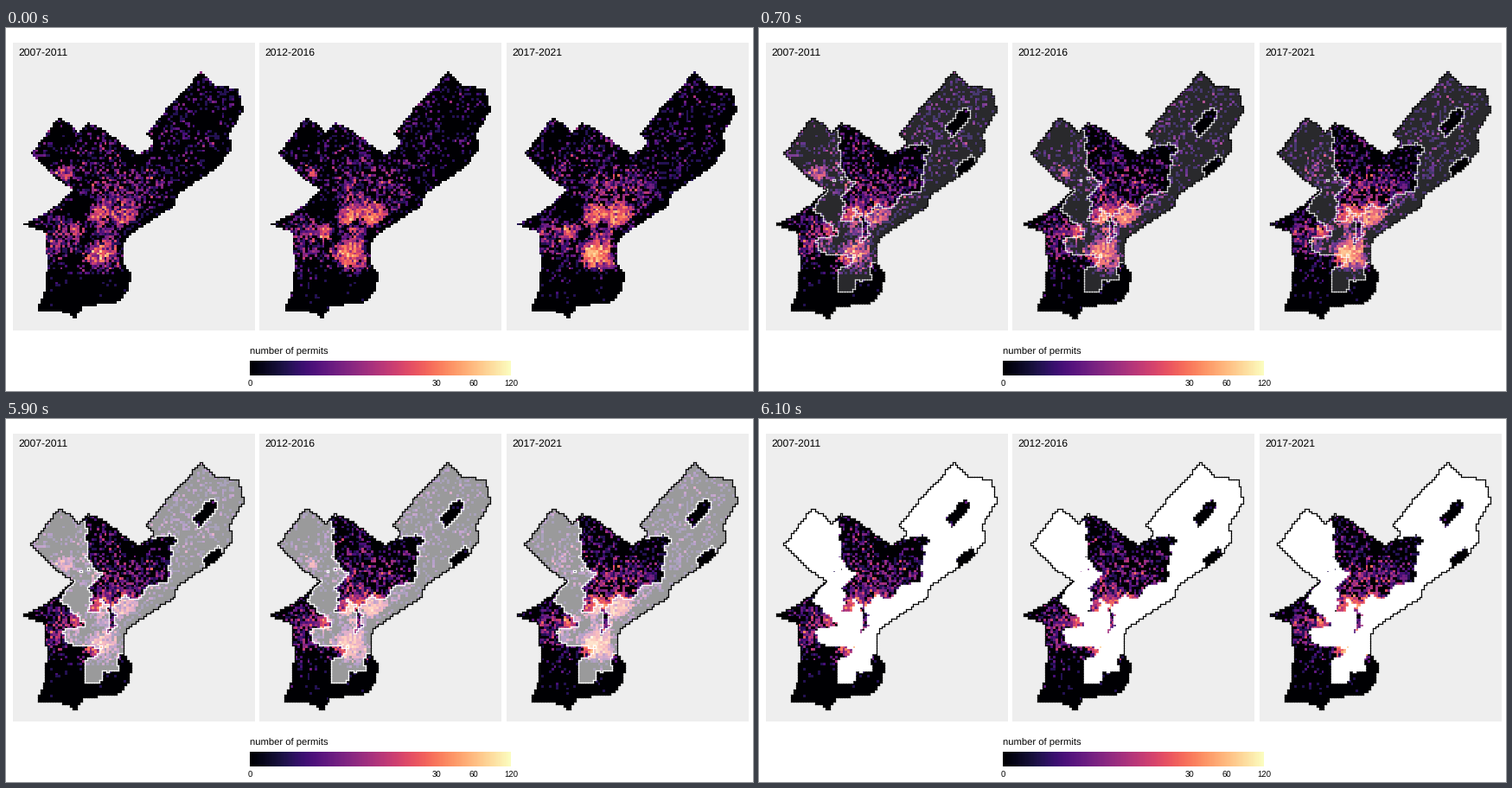
A matplotlib script for the animation above (8 s loop, 864 px wide and 420 px high).

```python
import numpy as np
import matplotlib.pyplot as plt
from matplotlib.animation import FuncAnimation
from matplotlib.collections import LineCollection
from matplotlib.path import Path
from matplotlib.patches import Rectangle

W, H, DPI = 864, 420, 100
FRAME_MS, FRAMES = 100, 80
PITCH = 285.5
CELL, X0, Y0, NX, NY = 2.83, 20, 50, 91, 102
PERIODS = ["2007-2011", "2012-2016", "2017-2021"]

# key points of the city limit, clockwise, and of the areas that stay dark
CITY = [(162, 123), (190, 88), (226, 50), (240, 66), (268, 70), (275, 95),
        (257, 123), (262, 139), (243, 163), (215, 181), (200, 191), (193, 207),
        (157, 230), (138, 243), (135, 269), (144, 285), (142, 302), (132, 317),
        (90, 322), (80, 337), (70, 329), (36, 327), (45, 301), (48, 272),
        (44, 236), (19, 228), (50, 212), (77, 187), (55, 172), (29, 145),
        (62, 102), (84, 120), (96, 110), (113, 118), (153, 147), (172, 132)]
NORTH = [(84, 112), (113, 110), (153, 140), (163, 135), (201, 135), (190, 150),
         (189, 184), (158, 197), (156, 208), (138, 205), (125, 216), (125, 247),
         (117, 247), (119, 212), (109, 212), (109, 223), (96, 223), (97, 191),
         (107, 180), (92, 157), (93, 125)]
SOUTHWEST = [(80, 185), (62, 210), (82, 228), (92, 236), (66, 246), (66, 255),
             (82, 262), (108, 263), (108, 270), (92, 279), (90, 304), (109, 305),
             (110, 291), (128, 291), (130, 271), (150, 270), (150, 345), (10, 345),
             (10, 185)]
AIRFIELD = [(215, 119), (220, 109), (238, 90), (246, 101), (222, 125)]
RIVERSIDE = [(226, 161), (245, 146), (253, 157), (232, 176)]
SPOTS = [(87, 177), (96, 173)]

# x, y, radius, first strength, growth from period to period
HOTSPOTS = [(111, 217, 12, 20, 1.25), (137, 217, 13, 15, 1.6), (105, 262, 11, 20, 1.4),
            (118, 264, 15, 10, 1.6), (82, 236, 8, 14, 1.1), (62, 241, 20, 4, 1.1),
            (120, 245, 14, 6, 1.2), (118, 190, 17, 3.5, 1.15), (66, 167, 8, 10, .7),
            (158, 193, 22, 2, 1.1), (125, 162, 38, .9, 1.15)]
# x, y, radius of areas with hardly any permits
VOIDS = [(82, 208, 16), (231, 107, 14), (94, 241, 6), (120, 227, 6),
         (240, 160, 10), (147, 146, 14), (66, 126, 14), (130, 290, 12), (98, 295, 12)]

gx, gy = np.meshgrid(X0 + (np.arange(NX) + .5) * CELL, Y0 + (np.arange(NY) + .5) * CELL)


def inside(points, ragged=0):
    """Cells within a polygon; ragged moves its edge to and fro by that many pixels."""
    x = gx + ragged * (np.sin(gy * .52) + np.sin(gy * .21 + gx * .05))
    y = gy + ragged * (np.sin(gx * .47) + np.sin(gx * .23 + gy * .07))
    return Path(points).contains_points(np.c_[x.ravel(), y.ravel()]).reshape(gx.shape)


city = inside(CITY)
dark = inside(NORTH, 1.3) | inside(SOUTHWEST, .8) | inside(AIRFIELD, .8) | inside(RIVERSIDE)
for sx, sy in SPOTS:
    dark[int((sy - Y0) / CELL), int((sx - X0) / CELL)] = True
dark &= city
zone = city & ~dark


def borders(a, b):
    """Cell edges that have a on one side and b on the other."""
    a, b = np.pad(a, 1), np.pad(b, 1, constant_values=b[0, 0])
    side = (a[:, :-1] & b[:, 1:]) | (b[:, :-1] & a[:, 1:])
    level = (a[:-1] & b[1:]) | (b[:-1] & a[1:])
    edges = [((c, r - 1), (c, r)) for r, c in np.argwhere(side)]
    edges += [((c - 1, r), (c, r)) for r, c in np.argwhere(level)]
    return np.array(edges, float) * CELL + (X0, Y0)


def bump(x, y, radius, power):
    reach = ((gx - x) ** 2 + (gy - y) ** 2) / radius ** 2
    return np.exp(-reach ** power)


def permits(period, rng):
    rate = np.full(gx.shape, .5)
    for x, y, radius, strength, growth in HOTSPOTS:
        rate += strength * growth ** period * bump(x, y, radius, 1.4)
    for x, y, radius in VOIDS:
        rate *= 1 - .95 * bump(x, y, radius, 3)
    rate *= .12 + .88 / (1 + np.exp((gy - 288) / 5))
    shore = ~np.roll(city, (-3, -3), axis=(0, 1))
    rate[shore] *= .15
    shape = .22 + rate / 11
    return rng.poisson(rng.gamma(shape) / shape * rate)


plt.rcParams["text.hinting"] = "none"
fig = plt.figure(figsize=(W / DPI, H / DPI), dpi=DPI, facecolor="white")
ax = fig.add_axes([0, 0, 1, 1])
ax.axis("off")


def label(x, y, text, px, **kw):
    ax.text(x, y, text, family="Liberation Sans", fontsize=px * 72 / DPI,
            color="black", va="baseline", **kw)


def image(data, left, **kw):
    extent = (X0 + left, X0 + left + NX * CELL, Y0 + NY * CELL, Y0)
    return ax.imshow(data, extent=extent, aspect="auto", interpolation="nearest", **kw)


def outline(edges, left, color, width, z):
    lines = LineCollection(edges + (left, 0), colors=color, linewidths=width * 72 / DPI,
                           capstyle="projecting", zorder=z)
    return ax.add_collection(lines)


rng = np.random.default_rng(7)
veil = np.ones((NY, NX, 4))
veil[..., 3] = zone
inner, outer = borders(zone, dark), borders(city, ~city)
veils, strokes = [], []
for i, name in enumerate(PERIODS):
    left = i * PITCH
    ax.add_patch(Rectangle((8 + int(left), 17), 280, 333, fc="#eeeeee", lw=0, zorder=0))
    label(14 + left, 32, name, 12.1)
    shade = np.log1p(permits(i, rng)) / np.log(121)
    image(np.ma.masked_where(~city, shade), left, cmap="magma", vmin=0, vmax=1, zorder=1)
    veils.append(image(veil, left, zorder=2))
    strokes.append(outline(inner, left, "white", 1.3, 3))
    strokes.append(outline(outer, left, "black", 1.2, 4))

label(282, 378, "number of permits", 11.2)
ax.imshow(np.linspace(0, 1, 302)[None], cmap="magma", extent=(282, 584, 402, 385),
          aspect="auto", interpolation="nearest")
for n in (0, 30, 60, 120):
    label(282 + 302 * np.log1p(n) / np.log(121), 415, str(n), 9.6, ha="center")
ax.set_xlim(0, W)
ax.set_ylim(H, 0)


def ramp(frame, start):
    return min(max(frame - start + 1, 0), 4) / 4


def update(frame):
    shown, cleared = ramp(frame, 5), ramp(frame, 58)
    for v in veils:
        v.set_alpha(.22 * shown + .78 * cleared)
    for s in strokes:
        s.set_alpha(shown)
    return veils + strokes


anim = FuncAnimation(fig, update, frames=FRAMES, interval=FRAME_MS, repeat=True,
                     repeat_delay=0, blit=False)
plt.show()
```
